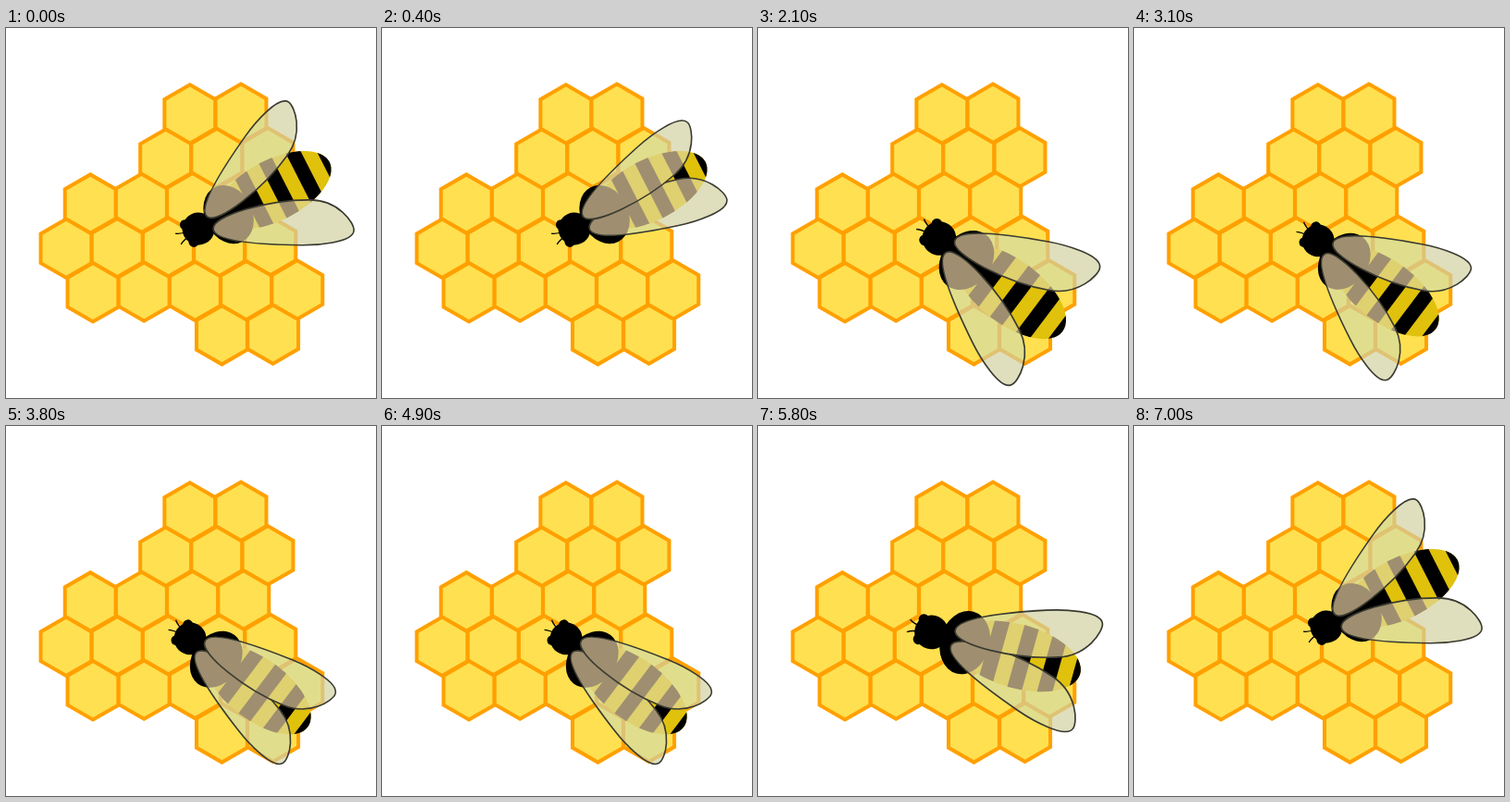
An HTML page with a canvas that plays this animation: 400 px wide and 400 px high, repeating every 7.1 s.

```html
<!DOCTYPE html>
<html lang="en">
<head>
<meta charset="utf-8">
<title>Bee on a honeycomb</title>
<style>
  html, body { margin: 0; width: 100%; height: 100%; overflow: hidden; background: #fff; }
  canvas { display: block; width: 400px; height: 400px; }
</style>
</head>
<body>
<canvas id="stage"></canvas>
<script>
const canvas = document.getElementById('stage');
const ctx = canvas.getContext('2d');
const ratio = window.devicePixelRatio || 1;
canvas.width = canvas.height = 400 * ratio;

const LOOP = 7100, CYCLE = 7000, STEP = 100, TAU = Math.PI * 2;

const PLAIN = { back: '#fff', cell: '#ffe050', edge: '#ffa000', dark: '#000', gold: '#e0c10c' };
const VEILED = { back: '#dfdfbe', cell: '#e0de8c', edge: '#dfc272', dark: '#9f8f70', gold: '#dfd070' };

// First and last column of each comb row on a slanted lattice
const ROWS = [[0, 1], [-1, 1], [-3, 0], [-4, 0], [-4, 0], [-2, -1]];

const START = { x: 279.3, y: 180.7, angle: -27 };
const END = { x: 263, y: 278, angle: 37 };
const HINGE = 65.5;

// Wing beats: time of the peak, half width, opening in degrees
const BEATS = [
  { peak: 100, width: 300, open: 19 },
  { peak: 1800, width: 300, open: 19 },
  { peak: 2300, width: 500, open: 19.5 },
  { peak: 3300, width: 500, open: 19 },
  { peak: 4300, width: 500, open: 3 },
  { peak: 5400, width: 500, open: 19 }
];

const wing = new Path2D('M0 0C0-14 60-32 105-32C135-32 152-8 152 0' +
  'C152 14 110 17 95 17C50 17 0 14 0 0Z');

const rad = deg => deg * Math.PI / 180;
const mix = (a, b, k) => a + (b - a) * k;
const ramp = (t, from, to) => Math.min(1, Math.max(0, (t - from) / (to - from)));

function spreadAt(t) {
  const lifts = BEATS.map(({ peak, width, open }) => {
    const gap = Math.abs(t - peak);
    return open * Math.max(0, 1 - Math.min(gap, CYCLE - gap) / width);
  });
  return 15 + Math.max(...lifts);
}

function poseAt(t) {
  const k = ramp(t, 1500, 2000) - ramp(t, 5600, 6200);
  const lift = ramp(t, 1500, 1900) - ramp(t, 2100, 2600)
    + ramp(t, 5100, 5600) - ramp(t, 5800, 6200);
  // The hinges travel along the chord of the turn, not along its arc
  const bend = 1 - Math.cos(rad(END.angle - START.angle));
  return {
    x: mix(START.x, END.x, k),
    y: mix(START.y, END.y, k),
    angle: rad(mix(START.angle, END.angle, k)),
    size: 1 + 0.05 * lift,
    hinge: HINGE * Math.sqrt(1 - 2 * k * (1 - k) * bend),
    spread: rad(spreadAt(t))
  };
}

function resetView() {
  ctx.setTransform(ratio, 0, 0, ratio, 0, 0);
}

function enterBee(pose) {
  ctx.translate(pose.x, pose.y);
  ctx.rotate(pose.angle);
  ctx.scale(pose.size, pose.size);
}

function oval(x, y, rx, ry) {
  ctx.beginPath();
  ctx.ellipse(x, y, rx, ry, 0, 0, TAU);
}

function drawCell(x, y) {
  ctx.beginPath();
  for (let i = 0; i < 6; i++) {
    const a = i * TAU / 6 + TAU / 12;
    ctx.lineTo(x + 31.7 * Math.cos(a), y + 31.7 * Math.sin(a));
  }
  ctx.closePath();
  ctx.fill();
  ctx.stroke();
}

function drawComb(colors) {
  ctx.fillStyle = colors.cell;
  ctx.strokeStyle = colors.edge;
  ctx.lineWidth = 4;
  ROWS.forEach(([first, last], row) => {
    for (let col = first; col <= last; col++) {
      drawCell(198.8 + 55.2 * col + 29 * row, 93 - 0.7 * col + 47.5 * row);
    }
  });
}

function drawTrunk(colors) {
  ctx.save();
  oval(12, 0, 67, 33);
  ctx.fillStyle = colors.gold;
  ctx.fill();
  ctx.clip();
  ctx.fillStyle = colors.dark;
  for (let x = -20.5; x < 80; x += 30.8) ctx.fillRect(x, -40, 15.4, 80);
  ctx.restore();
  ctx.fillStyle = colors.dark;
  oval(-44, 1, 25.5, 33);
  ctx.fill();
}

function drawHead() {
  ctx.fillStyle = ctx.strokeStyle = PLAIN.dark;
  ctx.lineWidth = 1.3;
  oval(-80, 0, 17.5, 17.5);
  ctx.fill();
  for (const side of [-1, 1]) {
    oval(-91, 10.5 * side, 5.5, 5.5);
    ctx.fill();
    ctx.beginPath();
    ctx.moveTo(-92, 3 * side);
    ctx.quadraticCurveTo(-99, 3 * side, -104.5, 6.6 * side);
    ctx.stroke();
  }
}

function drawScene(colors, pose) {
  ctx.save();
  resetView();
  ctx.fillStyle = colors.back;
  ctx.fillRect(0, 0, 400, 400);
  drawComb(colors);
  enterBee(pose);
  drawTrunk(colors);
  ctx.restore();
}

// A wing shows the scene behind it in veiled colours
function drawWing(pose, side) {
  ctx.save();
  ctx.scale(1, side);
  ctx.translate(-pose.hinge, 7);
  ctx.rotate(pose.spread);
  ctx.save();
  ctx.clip(wing);
  drawScene(VEILED, pose);
  ctx.restore();
  ctx.strokeStyle = '#3a3a30';
  ctx.lineWidth = 1.6;
  ctx.stroke(wing);
  ctx.restore();
}

function draw(now) {
  const t = Math.floor((now % LOOP) / STEP) * STEP % CYCLE;
  const pose = poseAt(t);
  resetView();
  drawScene(PLAIN, pose);
  enterBee(pose);
  drawHead();
  drawWing(pose, 1);
  drawWing(pose, -1);
}

let origin = null;
function tick(now) {
  if (origin === null) origin = now;
  draw(Math.max(0, now - origin));
  requestAnimationFrame(tick);
}
draw(0);
requestAnimationFrame(tick);
</script>
</body>
</html>
```
